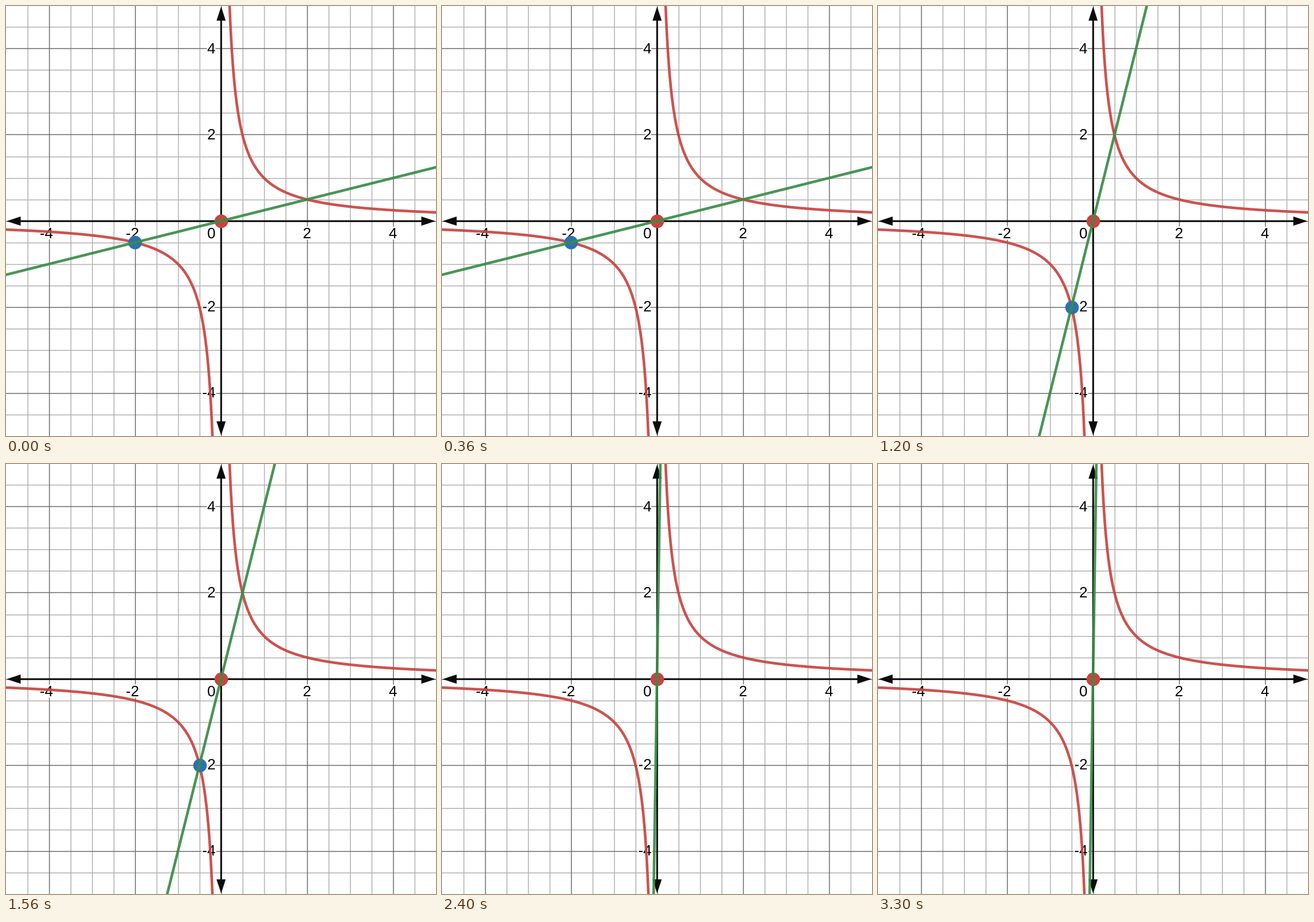
These frames come from a looping animation (748x748 px, 3.9 s). A matplotlib script:

```python
import math

import numpy as np
import matplotlib.pyplot as plt
import matplotlib.patheffects as pe
from matplotlib.animation import FuncAnimation

SIZE, DPI = 748, 100
ORIGIN, UNIT = 374, 74.8
PX = 72 / DPI  # one pixel in points
CELL = SIZE / 500  # grid lines snap to a 500 x 500 raster
RED, GREEN, BLUE, INK = "#c74440", "#388c46", "#2d70b3", "#0c0c0c"
FRAMES, INTERVAL = 13, 300

fig = plt.figure(figsize=(SIZE / DPI, SIZE / DPI), dpi=DPI, facecolor="white")
ax = fig.add_axes([0, 0, 1, 1])
ax.set(xlim=(0, SIZE), ylim=(SIZE, 0))
ax.axis("off")


def to_px(x, y):
    return ORIGIN + UNIT * np.asarray(x), ORIGIN - UNIT * np.asarray(y)


def stroke(xs, ys, color, width, z, alpha=1.0):
    return ax.plot(xs, ys, color=color, lw=width * PX, alpha=alpha, zorder=z,
                   solid_capstyle="butt", snap=False)[0]


def dot(x, y, color):
    px, py = to_px(x, y)
    return ax.plot([px], [py], "o", ms=23.6 * PX, mew=0, color=color,
                   zorder=6, snap=False)[0]


def label(text, x, baseline, align):
    halo = pe.withStroke(linewidth=5 * PX, foreground="white")
    ax.text(x, baseline, text, family="Liberation Sans", size=26 * PX,
            color="black", ha=align, va="baseline", zorder=4,
            path_effects=[halo])


def snapped(cells):
    return (math.floor(cells) + 0.5) * CELL


def grid_lines():
    for k in range(-9, 10):
        x = snapped(250.5 + 25 * k)
        y = snapped(250.17 + 25.05 * k)
        color, z = ("#6a6a6a", 2) if k % 4 == 0 else ("#b0b0b0", 1)
        stroke([x, x], [0, SIZE], color, CELL, z)
        stroke([0, SIZE], [y, y], color, CELL, z)


def axes_with_arrows():
    mid, tip, base, half = ORIGIN + 0.2, 1, 25.5, 8
    for near, far in ((tip, base), (SIZE - tip, SIZE - base)):
        along, across = [near, far, far], [mid, mid - half, mid + half]
        ax.fill(along, across, color=INK, lw=0, zorder=3)
        ax.fill(across, along, color=INK, lw=0, zorder=3)
    stroke([mid, mid], [base - 5, SIZE - base + 5], INK, 3, 3)
    stroke([base - 5, SIZE - base + 5], [mid, mid], INK, 3, 3)


def number_labels():
    label("0", 364.5, 404, "right")
    for n in (-4, -2, 2, 4):
        x, y = to_px(n, n)
        label(str(n), x - (4.5 if n < 0 else 0), 404, "center")
        label(str(n), 364.5, y + 7.7, "right")


grid_lines()
axes_with_arrows()
number_labels()

branch = np.geomspace(0.15, 6, 400)
for sign in (-1, 1):
    stroke(*to_px(sign * branch, sign / branch), RED, 4.6, 5, 0.92)

dot(0, 0, RED)
moving_dot = dot(-2, -0.5, BLUE)
secant = stroke([], [], GREEN, 4.6, 7, 0.92)


def update(frame):
    # The point halves its distance to the y axis on every step.
    step = min(frame // 2, 4)
    x = -2 / 2 ** step
    y = 1 / x
    px, py = to_px(x, y)
    moving_dot.set_data([px], [py])
    reach = 6 / max(abs(x), abs(y))
    secant.set_data(*to_px([-reach * x, reach * x], [-reach * y, reach * y]))
    return moving_dot, secant


anim = FuncAnimation(fig, update, frames=FRAMES, interval=INTERVAL,
                     repeat=True, repeat_delay=0, blit=False)
plt.show()
```
